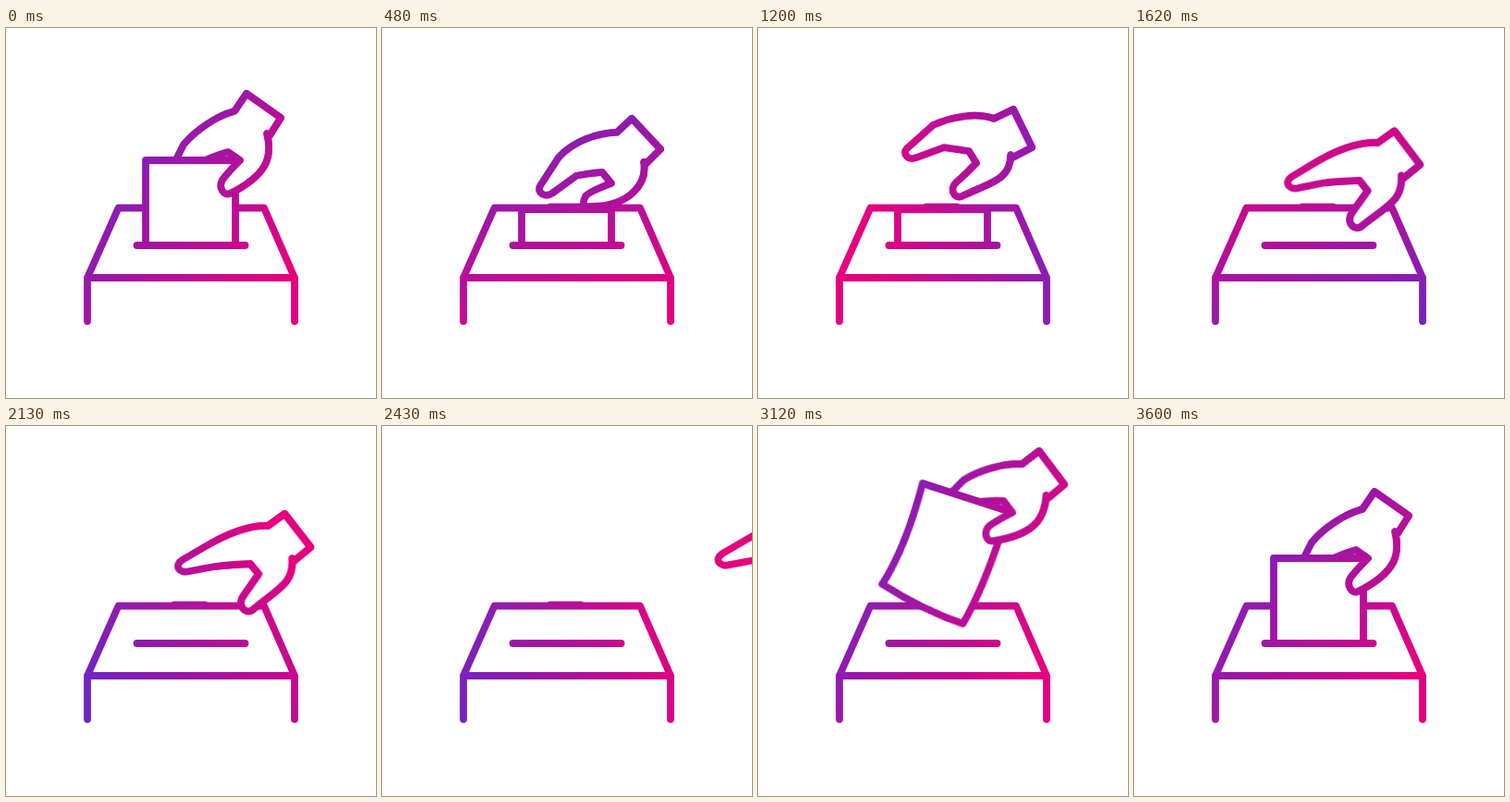
Animation, 400 px wide and 400 px high, one loop 5.63 s. Source, as an HTML page without scripts:

```html
<!DOCTYPE html>
<html lang="en">
<head>
<meta charset="utf-8">
<title>Casting a vote</title>
<style>
  html, body { margin: 0; width: 100%; height: 100%; overflow: hidden; background: #fff; }
  svg { display: block; width: 100%; height: 100%; isolation: isolate; }

  .ink { fill: none; stroke: #000; stroke-width: 7.8; stroke-linecap: round; stroke-linejoin: round; }
  .solid { fill: #fff; }
  .hand, .card { transform-origin: 260px 71px; }
  .hand { animation: hand 5630ms linear infinite; }
  .card { animation: card 5630ms linear infinite; }

  /* Screen blending tints the black line work and leaves white alone */
  .tint { mix-blend-mode: screen; transform-origin: 200px 200px; animation: turn 5630ms linear infinite; }

  @keyframes turn {
    0% { transform: rotate(35deg) translateX(0); }
    8.53% { transform: rotate(67deg) translateX(0); }
    21.31% { transform: rotate(180deg) translateX(-40px); }
    37.83% { transform: rotate(330deg) translateX(0); }
    49.56% { transform: rotate(365deg) translateX(-22px); }
    55.42% { transform: rotate(385deg) translateX(-10px); }
    63.94%, 100% { transform: rotate(395deg) translateX(0); }
  }

  @keyframes hand {
    /* grip */
    0%, 44.31%, 63.94%, 100% {
      d: path("M247 90 L260 71 L297 97 L285 116 L282 114 C288 138 284 158 242 179 C236 182 229 173 234 164 Q240 156 253 143 L240 134 Q232 136 215 143 L192 153 C186 160 176 158 181 148 L192 126 C205 110 228 95 247 90 Z");
    }
    0% { transform: translate(0, 0) rotate(0deg); }
    /* let go */
    8.53% {
      d: path("M254 113 L270 98 L301 131 L285 147 L283 145 C287 168 268 193 226 193 C218 194 216 190 220 182 Q222 178 248 168 L238 156 Q224 157 210 160 L184 179 C176 184 167 178 171 171 L191 140 C208 122 232 114 254 113 Z");
      transform: translate(0, 0) rotate(0deg);
    }
    /* hover */
    10.66%, 15.45%, 21.31% {
      d: path("M255 98 L276 88 L296 129 L275 140 L273 137 C273 165 250 167 220 182 C211 185 207 173 214 167 Q222 160 236 146 L228 133 Q215 131 201 129 L171 140 C163 144 155 136 161 130 L189 105 C208 96 235 91 255 98 Z");
    }
    10.66% { transform: translate(0, -6px) rotate(0deg); }
    15.45% { transform: translate(-1px, -13px) rotate(0deg); }
    21.31% { transform: translate(0, 0) rotate(0deg); }
    /* push, then leave */
    29.31%, 30.91%, 37.83%, 44.3% {
      d: path("M283 108 L301 95 L329 131 L311 146 L309 143 C311 170 295 175 266 199 C258 204 249 193 257 183 Q262 176 273 160 L264 149 Q240 150 225 152 L198 157 C187 160 181 151 190 145 L214 131 C238 117 262 107 283 108 Z");
    }
    29.31%, 30.91% { transform: translate(-19px, 18px) rotate(0deg); }
    37.83% { transform: translate(0, 0) rotate(0deg); }
    40.5% { transform: translate(29px, 0) rotate(0deg); }
    44.3% { transform: translate(240px, -10px) rotate(0deg); }
    /* return with a new card */
    44.31% { transform: translate(190px, -290px) rotate(80deg); }
    49.56% { transform: translate(110px, -86px) rotate(53deg); }
    55.42% { transform: translate(44px, -44px) rotate(18deg); animation-timing-function: cubic-bezier(.2, .4, .5, 1); }
    63.94%, 100% { transform: translate(0, 0) rotate(0deg); }
  }

  @keyframes card {
    0%, 44.3%, 63.94%, 100% {
      d: path("M151 143 L248 143 Q248 202 248 262 Q200 262 151 262 Q151 202 151 143 Z");
    }
    0% { transform: translate(0, 0) rotate(0deg); }
    8%, 21.31% { transform: translate(0, 53px) rotate(0deg); }
    29.31%, 44.3% { transform: translate(0, 96px) rotate(0deg); }
    44.31% { transform: translate(190px, -290px) rotate(80deg); }
    44.31%, 49.56% {
      d: path("M151 143 L248 143 Q250 237 223 287 Q178 267 130 243 Q146 205 151 143 Z");
    }
    49.56% { transform: translate(110px, -86px) rotate(53deg); }
    55.42% {
      d: path("M151 143 L248 143 Q250 225 239 274 Q192 273 143 260 Q155 215 151 143 Z");
      transform: translate(44px, -44px) rotate(18deg);
      animation-timing-function: cubic-bezier(.2, .4, .5, 1);
    }
    63.94%, 100% { transform: translate(0, 0) rotate(0deg); }
  }
</style>
</head>
<body>
<svg viewBox="0 0 400 400">
  <defs>
    <linearGradient id="hue" gradientUnits="userSpaceOnUse" x1="22" y1="0" x2="325" y2="0">
      <stop offset="0" stop-color="#5c2bcb"/>
      <stop offset="1" stop-color="#e6007e"/>
    </linearGradient>
    <clipPath id="aboveSlot"><rect width="400" height="235"/></clipPath>
    <clipPath id="thumbSide"><rect x="226" width="200" height="300"/></clipPath>
  </defs>
  <rect width="400" height="400" fill="#fff"/>
  <g class="ink">
    <path d="M88 317 V270 L121.500 194.500 H279 L312 270 V317 M88 270 H312 M182 193.500 H215"/>
    <path class="solid hand"/>
    <g clip-path="url(#aboveSlot)"><path class="solid card"/></g>
    <path d="M141.500 235 H258.500"/>
    <path class="solid hand" clip-path="url(#thumbSide)"/>
  </g>
  <rect class="tint" x="-200" y="-200" width="800" height="800" fill="url(#hue)"/>
</svg>
</body>
</html>
```
